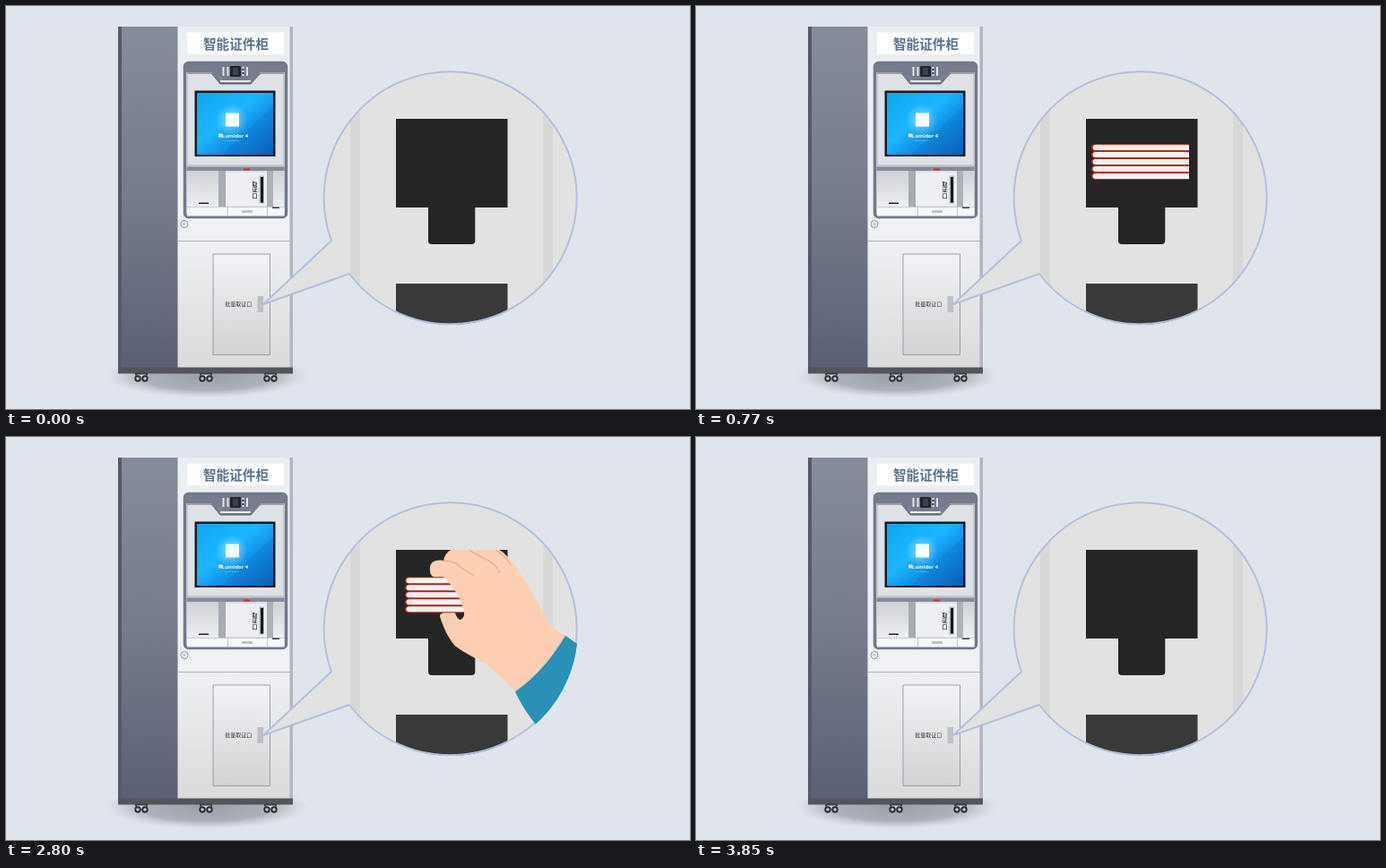
Recreate the animation shown at these times as an HTML page. Size 763 by 450 pixels, loop 6.37 s.

```html
<!DOCTYPE html>
<html lang="zh">
<head>
<meta charset="utf-8">
<title>智能证件柜</title>
<style>
  html, body { margin: 0; width: 100%; height: 100%; overflow: hidden; background: #e0e5ec; }
  svg { display: block; width: 763px; height: 450px; }
  text { font-family: "Noto Sans CJK SC", "Noto Sans CJK", sans-serif; text-anchor: middle; }
  .latin { font-family: "Open Sans", sans-serif; }
</style>
</head>
<body>
<svg viewBox="0 0 763 450" xmlns="http://www.w3.org/2000/svg">
  <defs>
    <linearGradient id="side" x1="0" y1="0" x2="0" y2="1">
      <stop offset="0" stop-color="#858c9a"/><stop offset=".5" stop-color="#747b8c"/><stop offset="1" stop-color="#5a6176"/>
    </linearGradient>
    <linearGradient id="front" x1="0" y1="0" x2="0" y2="1">
      <stop offset="0" stop-color="#eceef2"/><stop offset=".6" stop-color="#f1f2f5"/><stop offset="1" stop-color="#dadadd"/>
    </linearGradient>
    <linearGradient id="door" x1="0" y1="0" x2="0" y2="1">
      <stop offset="0" stop-color="#f2f3f6"/><stop offset="1" stop-color="#d3d3d6"/>
    </linearGradient>
    <linearGradient id="bay" x1="0" y1="0" x2="0" y2="1">
      <stop offset="0" stop-color="#cfd1d6"/><stop offset="1" stop-color="#eeeff2"/>
    </linearGradient>
    <linearGradient id="screen" x1="0" y1="0" x2="1" y2="1">
      <stop offset="0" stop-color="#0ca6f4"/><stop offset=".42" stop-color="#1cb6ff"/>
      <stop offset=".62" stop-color="#0f93ea"/><stop offset="1" stop-color="#0b62b8"/>
    </linearGradient>
    <radialGradient id="glow">
      <stop offset="0" stop-color="#fff" stop-opacity=".5"/><stop offset="1" stop-color="#fff" stop-opacity="0"/>
    </radialGradient>
    <radialGradient id="shade">
      <stop offset="0" stop-color="#9a9fa7"/><stop offset=".65" stop-color="#a4a9b1" stop-opacity=".85"/>
      <stop offset="1" stop-color="#c5cad2" stop-opacity="0"/>
    </radialGradient>
    <clipPath id="lens"><circle cx="496" cy="215" r="141"/></clipPath>
    <clipPath id="crop"><circle cx="496" cy="215" r="142"/></clipPath>
    <clipPath id="below"><rect x="300" y="126" width="463" height="324"/></clipPath>
    <g id="wheel">
      <rect x="-7" y="0" width="14" height="3" fill="#3f4045"/>
      <rect x="-5" y="2" width="10" height="3" fill="#d5d6da"/>
      <circle cx="-4" cy="6.500" r="3.700" fill="#2b2c30"/><circle cx="4" cy="6.500" r="3.700" fill="#2b2c30"/>
      <circle cx="-4" cy="6.500" r="1.800" fill="#c6c8cd"/><circle cx="4" cy="6.500" r="1.800" fill="#c6c8cd"/>
    </g>
    <g id="book">
      <path d="M550 0H445Q441 .4 441 4T445 8H550Z" fill="#b9281b"/>
      <path d="M550 1H446Q442.6 1.2 442.6 4T446 7H550Z" fill="#f3f1ef"/>
    </g>
  </defs>

  <rect width="763" height="450" fill="#e0e5ec"/>

  <!-- cabinet -->
  <ellipse cx="224" cy="413" rx="114" ry="25" fill="url(#shade)"/>
  <rect x="125" y="23" width="67" height="382" fill="url(#side)"/>
  <rect x="125" y="23" width="4" height="382" fill="#535a6d"/>
  <rect x="191.500" y="23" width="126" height="382" fill="url(#front)"/>
  <rect x="316.500" y="23" width="3.500" height="382" fill="#b2b5bd"/>
  <rect x="125" y="403.500" width="195" height="7" fill="#545559"/>
  <use href="#wheel" x="151" y="409.500"/><use href="#wheel" x="223" y="409.500"/><use href="#wheel" x="295" y="409.500"/>

  <rect x="202" y="29.500" width="108" height="24.500" fill="#fff"/>
  <text x="256.500" y="47.500" font-size="14.600" font-weight="900" fill="#5b708e">智能证件柜</text>

  <rect x="199.500" y="63.500" width="113" height="172" rx="4" fill="#dfe1e5" stroke="#71798b" stroke-width="3.500"/>
  <path d="M200 64H312V74H284L273 87H239L229 74H200Z" fill="#747c8d"/>
  <path d="M202 75H229L239 87H273L284 75H310" fill="none" stroke="#596072"/>
  <path d="M237 78L242 84H270L276 78" fill="none" stroke="#8f97a6"/>
  <rect x="239" y="83" width="34" height="2" fill="#eceef1"/>
  <rect x="250" y="67" width="12" height="12" rx="1" fill="#22252c"/>
  <rect x="253" y="69" width="6" height="8" fill="#3d434e"/>
  <path d="M242.500 68V78M247.500 68V78M264.500 68V78M269 68V78" stroke="#e4e7ec" stroke-width="2"/>
  <path d="M264.500 70V76" stroke="#33363e" stroke-width="2" stroke-dasharray="2 2"/>

  <path d="M202 76V178H310V76" fill="none" stroke="#c4c7cd" stroke-width="2"/>
  <rect x="210.500" y="94.500" width="90" height="73.500" fill="#171b24"/>
  <rect x="213" y="97" width="85" height="69" fill="url(#screen)"/>
  <path d="M240 166L298 112V166Z" fill="#0b4f9f" opacity=".15"/>
  <circle cx="252" cy="127" r="18" fill="url(#glow)"/>
  <rect x="245" y="119.500" width="15" height="15" fill="#fff"/>
  <rect x="237" y="142.500" width="4" height="4" fill="#f3d9c4"/>
  <text class="latin" x="255.500" y="147" font-size="5.800" font-weight="700" fill="#fff">Lumidor 4</text>
  <text class="latin" x="252" y="150.500" font-size="2.400" fill="#d5efff">home edition</text>

  <rect x="201.500" y="179" width="109" height="5" fill="#868b97"/>
  <rect x="201.500" y="179" width="109" height="1" fill="#a9adb6"/>
  <rect x="265" y="181.500" width="7" height="2" fill="#e3262b"/>
  <rect x="283" y="181.500" width="1.500" height="1.500" fill="#cc5a5e"/>
  <rect x="202" y="184" width="35" height="41" fill="url(#bay)"/>
  <rect x="237" y="184" width="8" height="40" fill="#a7abb4"/>
  <rect x="245" y="186" width="46" height="37" fill="#eeeff2"/>
  <rect x="291" y="184" width="19" height="40" fill="url(#bay)"/>
  <rect x="291" y="184" width="7" height="40" fill="#adb1b9"/>
  <g font-size="6" font-weight="700" fill="#3d4049">
    <text x="277.500" y="201">取</text><text x="277.500" y="207">证</text><text x="277.500" y="213.500">口</text>
  </g>
  <rect x="282.500" y="189.500" width="5.500" height="31" fill="#b4b7be"/>
  <rect x="284" y="191" width="3" height="28.500" fill="#15171c"/>
  <rect x="215" y="219.500" width="11" height="1.500" fill="#25272c"/>
  <rect x="202" y="225" width="108.500" height="9.500" fill="#f7f8fa"/>
  <path d="M247.500 225V234M291.500 225V234M202 224.500H310" stroke="#c6c9cf"/>
  <rect x="297" y="224.500" width="8" height="1.500" fill="#3b3d43"/>
  <rect x="263" y="228" width="12" height="3" fill="#c1c4ca"/>

  <circle cx="199" cy="243.500" r="4" fill="#f3f3f5" stroke="#8e929a"/>
  <circle cx="199" cy="243.500" r="1.800" fill="#c9ccd1"/>
  <path d="M192 262.500H317" stroke="#aeb1b8"/>
  <rect x="231" y="277" width="63.500" height="112.500" fill="url(#door)" stroke="#96989f" stroke-width=".9"/>
  <text x="259.300" y="335.300" font-size="6" font-weight="500" fill="#34363b">批量取证口</text>
  <rect x="280.500" y="324" width="6.500" height="18" fill="#bfc0c4"/>

  <!-- magnifier bubble -->
  <path d="M363 262L287 333L383 299A141 141 0 1 0 363 262Z" fill="#e2e2e2"/>
  <g clip-path="url(#lens)">
    <path d="M384 70H395V360H384ZM599 70H610V360H599Z" fill="#d8d8d8"/>
    <rect x="435" y="310" width="124.500" height="50" fill="#393939"/>
  </g>
  <path d="M435 126H559.500V225H523.300V262Q523.300 266 519.300 266H475Q471 266 471 262V225H435Z" fill="#252525"/>
  <path d="M363 262L287 333L383 299A141 141 0 1 0 363 262Z" fill="none" stroke="#b2c0df" stroke-width="2" stroke-linejoin="round"/>

  <!-- certificates and hand -->
  <g id="window">
    <g clip-path="url(#below)"><g clip-path="url(#crop)"><g id="load">
      <g id="stack">
        <use href="#book" y="154"/><use href="#book" y="162"/><use href="#book" y="170"/>
        <use href="#book" y="178"/><use href="#book" y="186"/>
      </g>
      <g id="hand">
        <path fill="#fecfb3" d="M469 147C468 140 472 135.500 478 135.500Q482 135 484 136C485 129 490 124 499 120Q504 118.500 508 120C516 120 519 115 528 115C534 115 535 121 539 122Q547 122 554 130C572 149 586 176 597 198Q604 211 620 220L624 226L572 288L566 283C553 270 545 262 530 251C517 243 507 239 497 231C489 222 483 208 480 198Q480 194 486 194H497Q499 201 503 202Q508 199 507 193C504 178 494 163 484 154H473Q469 152 469 147Z"/>
        <g fill="none" stroke="#dca78a" stroke-width="1.100" stroke-linecap="round">
          <path d="M484 136Q494 135 502 142T518 152"/>
          <path d="M508 120Q516 127 529 133T547 149"/>
          <path d="M539 122Q551 128 559 140"/>
        </g>
        <path fill="#2990b8" d="M620 219.500L680 262L615 350Q577 312 564 282Q596 260 620 219.500Z"/>
      </g>
    </g></g></g>
  </g>
</svg>
<script>
  const LOOP = 6370, STEP = 70;
  const $ = id => document.getElementById(id);
  const clamp = v => Math.min(1, Math.max(0, v));
  const inOut = p => p < .5 ? 2 * p * p : 1 - 2 * (1 - p) ** 2;
  const move = (id, x, y) => $(id).setAttribute('transform', `translate(${x.toFixed(2)} ${y.toFixed(2)})`);

  function draw(t) {
    // certificates drop in
    move('stack', 0, -74 * (1 - clamp(t / 700)) ** 2.3);

    // hand fades in
    const fade = t < 1680 ? 0 : Math.min(.95, .27 + (t - 1680) / STEP * .17);
    $('hand').setAttribute('opacity', t < 2800 ? fade : 1);

    // hand pulls the stack out; past the lens edge the crop travels along
    const e = inOut(clamp((t - 2740) / 765));
    const x = 322 * e, y = 41 * e ** .66;
    const sx = Math.max(0, x - 44), sy = Math.max(0, y - 11);
    move('window', sx, sy);
    move('load', x - sx, y - sy);
    $('window').setAttribute('visibility', t > 0 && e < 1 ? 'visible' : 'hidden');
  }

  const start = performance.now();
  function tick() {
    const t = (performance.now() - start) % LOOP;
    draw(Math.floor(t / STEP) * STEP);
    requestAnimationFrame(tick);
  }
  tick();
</script>
</body>
</html>
```
